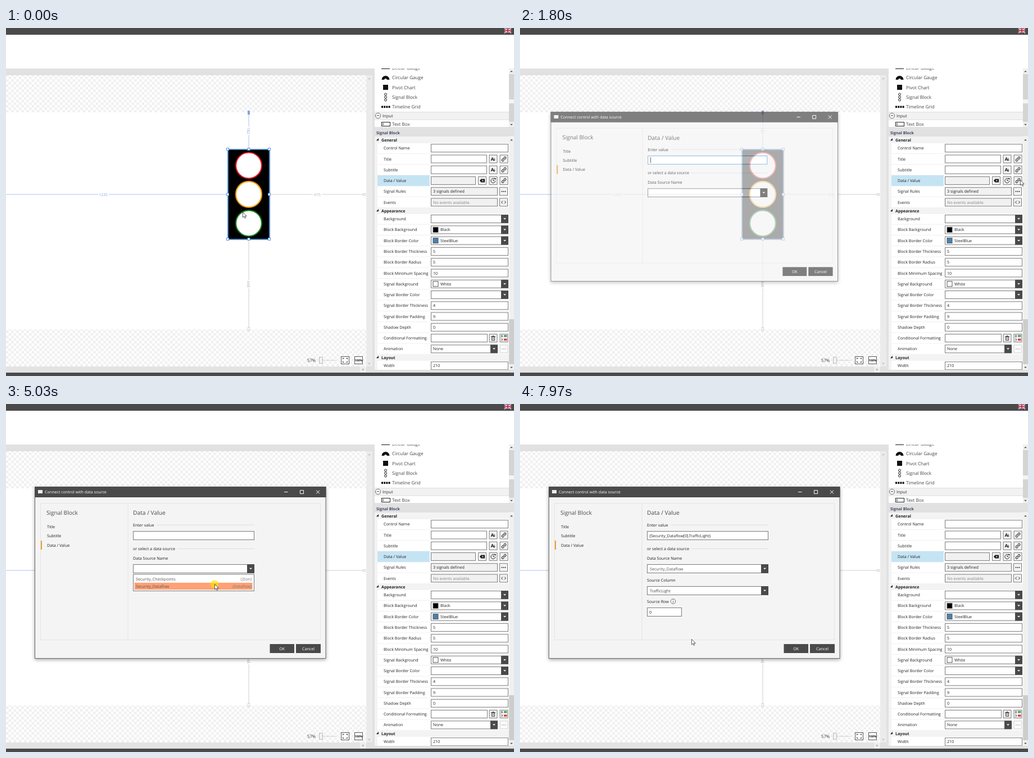
Recreate the animation shown at these times as an HTML page. Size 904x619 px, loop 8 s.

```html
<!DOCTYPE html>
<html lang="en">
<head>
<meta charset="utf-8">
<title>Connect a signal block</title>
<style>
html, body { margin: 0; width: 100%; height: 100%; overflow: hidden; background: #fff; }
svg { display: block; }
text { font-family: "Open Sans", "Noto Sans", sans-serif; text-rendering: geometricPrecision; }
</style>
</head>
<body>
<svg id="stage" width="904" height="619" viewBox="0 0 904 619"></svg>
<script>
const DARK = '#4a4a4a', BORDER = '#7a7a7a', BLUE = '#a9c2ef', GREY = '#cfcfcf';

const rect = (x, y, w, h, fill, extra = '') =>
  `<rect x="${x}" y="${y}" width="${w}" height="${h}" fill="${fill}" ${extra}/>`;
const box = (x, y, w, h, fill = '#fff', line = BORDER) =>
  rect(x + .5, y + .5, w - 1, h - 1, fill, `stroke="${line}"`);
const path = (d, stroke = '#222', width = 1, fill = 'none') =>
  `<path d="${d}" fill="${fill}" stroke="${stroke}" stroke-width="${width}"/>`;
const circle = (x, y, r, fill, stroke = 'none', width = 1) =>
  `<circle cx="${x}" cy="${y}" r="${r}" fill="${fill}" stroke="${stroke}" stroke-width="${width}"/>`;
// y is the vertical middle of the capitals
const text = (x, y, str, fill = '#222', size = 7.15, extra = '') =>
  `<text x="${x}" y="${y + size * .36}" font-size="${size}" fill="${fill}" ${extra}>${str}</text>`;
const arrow = (x, y, dir, fill = '#555', s = 2.5) =>
  path(`M${x - s} ${y - dir * s / 2}h${2 * s}l${-s} ${dir * s}z`, 'none', 0, fill);
const combo = (x, y, w, h = 16) =>
  box(x, y, w, h) + rect(x + w - 13, y, 13, h, DARK) + arrow(x + w - 6.5, y + h / 2, 1, '#fff');
const BOLD = 'font-weight="700"', MID = 'text-anchor="middle"', END = 'text-anchor="end"';

function frameAndCanvas() {
  let s = `<defs><pattern id="check" width="9.12" height="9.12" patternUnits="userSpaceOnUse">
    <path d="M0 0h4.56v9.12h4.56v-4.56h-9.12z" fill="#f0f0f0"/></pattern>
    <clipPath id="tools"><rect x="656" y="72" width="239" height="104"/></clipPath>
    <filter id="shadow" x="-5%" y="-5%" width="110%" height="112%">
    <feDropShadow dx="0" dy="2" stdDeviation="3" flood-opacity=".35"/></filter></defs>`;
  s += rect(0, 0, 904, 619, '#fff') + rect(0, 0, 904, 12, DARK) + rect(0, 72, 656, 541, '#e1e1e1');
  s += rect(887, 0, 12, 9, '#26356f') + path('M887 0l12 9M899 0l-12 9', '#fff', 1.8)
    + path('M887 0l12 9M899 0l-12 9', '#c8233a', .6)
    + path('M893 0v9M887 4.5h12', '#fff', 3.4) + path('M893 0v9M887 4.5h12', '#c8233a', 1.9);
  s += rect(0, 84, 641, 518, '#fff') + rect(0, 84, 641, 518, 'url(#check)') + rect(0, 150, 641, 386, '#fff');
  s += rect(641, 84, 11, 518, '#ebebeb') + arrow(646.5, 90, -1, '#aaa', 2) + arrow(646.5, 597, 1, '#aaa', 2);
  s += rect(0, 602, 641, 11, '#e3e3e3') + rect(630, 602, 11, 11, '#eee') + path('M634.5 605.5l2.5 2-2.5 2z', 'none', 0, '#999');

  s += path('M0 296h164M183 296h212M432 150v25M432 190v26', BLUE) + rect(430, 147, 4, 7, '#7fa3e0');
  s += path('M469 296h77M563 296h74M432 376v72M432 463v73', GREY)
    + box(635, 294, 5, 4, '#fff', GREY) + box(430, 532, 4, 7, '#fff', GREY);
  s += text(173, 296, '1235', '#8eabdf', 7, MID) + text(554, 296, '475', '#b5b5b5', 7, MID);
  s += `<g transform="translate(432 182.5) rotate(90)">${text(0, 0, '182', '#8eabdf', 7, MID)}</g>`
    + `<g transform="translate(432 455.5) rotate(90)">${text(0, 0, '448', '#b5b5b5', 7, MID)}</g>`;

  s += rect(395, 216, 74, 160, '#000', 'stroke="#4682b4" stroke-width="2" rx="2"');
  ['#dd1620', '#f79a0c', '#157a1d'].forEach((c, i) => s += circle(432, 244.5 + i * 51.4, 23, '#fff', c, 2.2));
  s += path('M394.5 215.5h74v160h-74z', '#5b92de', 1);
  for (const x of [394.5, 432, 468.5]) for (const y of [215.5, 296, 375.5])
    if (x != 432 || y != 296) s += box(x - 2.5, y - 2.5, 5, 5, '#fff', '#5b92de');

  s += text(536, 591, '57%', '#333', 7.7) + path('M563 591h25', '#ccc') + box(557, 585, 7, 12, '#f2f2f2', '#bbb');
  s += box(596, 584, 15, 14, '#fff', '#555') + path('M599.5 589v-1.5h2M605.5 587.5h2v1.5M607.5 593v1.5h-2M601.5 594.5h-2v-1.5', '#222')
    + box(620, 584, 15, 14, '#fff', '#555') + text(627.5, 591, '100%', '#111', 5.2, `${BOLD} ${MID}`);
  return s;
}

function toolbox() {
  let s = rect(656, 72, 248, 541, '#fff') + '<g clip-path="url(#tools)">';
  ['Linear Gauge', 'Circular Gauge', 'Pivot Chart', 'Signal Block', 'Timeline Grid']
    .forEach((name, i) => s += text(687, 71 + i * 17.35, name, '#444', 8.15));
  s += rect(668, 70, 15, 3, '#111');
  s += path('M668.5 92a7 7 0 0 1 14 0h-4.5a2.6 2.6 0 0 0-5 0z', 'none', 0, '#111') + rect(671, 101, 9, 9, '#111');
  for (const y of [118, 123, 128]) s += circle(675.5, y, 2, '#fff', '#222', 1);
  for (let i = 0; i < 4; i++) s += rect(668 + i * 4.2, 138.5, 3, 3.6, '#111');
  s += rect(656, 149, 239, 14, '#f2f2f2') + path('M656 149.5h239M656 163h239', '#ddd')
    + circle(662, 156, 4.7, '#fff', '#555', .9) + path('M659.8 157l2.2-2.2 2.2 2.2', '#333') + text(670, 156, 'Input', '#333', 7.5);
  s += box(668, 167, 16, 8, '#fff', '#222') + path('M671 169v4', '#222') + text(687, 171, 'Text Box', '#444', 8.15) + '</g>';
  s += rect(895, 72, 9, 104, '#f0f0f0') + rect(895, 82, 9, 85, '#d4d4d4') + rect(895, 127, 9, 7, '#f4f4f4')
    + arrow(899.5, 77, -1) + arrow(899.5, 172, 1);
  return s;
}

// Button glyphs, drawn around the centre of a 15px button
const GLYPH = {
  font: text(-1.5, 0, 'A', '#111', 8, `${BOLD} ${MID}`) + path('M2 -1.5v4M.8 1.5l1.2 1.5 1.2-1.5', '#111', .9),
  link: '<g transform="rotate(-45)">' + path('M-.3 -1.7h-2.7a1.7 1.7 0 0 0 0 3.4h2M.3 1.7h2.7a1.7 1.7 0 0 0 0-3.4h-2M-1.8 0h3.6', '#222') + '</g>',
  clear: path('M-4.5 0l2.5-3h6.5v6h-6.5z', 'none', 0, '#111') + path('M-.8 -1.5l3 3m0-3l-3 3', '#fff', .9),
  clock: path('M2.8 -2.6a4 4 0 1 0 1.1 2.8M0 -2.2v2.4h2', '#222') + path('M1.5 -4.5h3v3z', 'none', 0, '#222'),
  dots: [-3, 0, 3].map(x => circle(x, 0, .95, '#222')).join(''),
  code: path('M-1.5 -2.5l-2.5 2.5 2.5 2.5M1.5 -2.5l2.5 2.5-2.5 2.5', '#222'),
  bin: path('M-2.5 -2h5v6h-5zM-4 -2.8h8M-1 -4h2M0 -.5v3', '#222', .9),
  rules: rect(-5, -5, 3, 1, '#333') + rect(-5, -3, 3, 1, '#333') + rect(0, -5.5, 5.5, 3.5, '#54a15c')
    + path('M-4.5 1l2.5 1.8-2.5 1.8', '#333') + rect(0, 1, 5.5, 3.5, '#d8434a')
};
const button = (x, y, glyph, faded) => `<g opacity="${faded ? .35 : 1}">` + box(x - 7.5, y - 7.5, 15, 15, '#f3f3f3')
  + `<g transform="translate(${x} ${y})">${GLYPH[glyph]}</g></g>`;

function properties() {
  let s = rect(656, 176, 248, 17, '#e1e1e1') + text(659, 186.5, 'Signal Block', '#424860', 7, BOLD);
  s += rect(656, 193, 5, 415, '#f3f3f3');
  const group = (y, name) => s += rect(656, y - 6, 239, 12, '#f3f3f3') + path(`M663 ${y - 3}v4.2h-4.2z`, 'none', 0, '#222')
    + text(668, y, name, '#222', 7.15, BOLD);
  const row = (y, name, value) => {
    s += path(`M661 ${y + 9.6}h234`, '#ececec', .8);
    if (name == 'Data / Value') s += rect(661, y - 9.5, 93, 19, '#c5e4f3');
    s += text(672, y, name) + value(y);
  };
  const field = (str = '', w = 138, fill = '#fff', color = '#222') => y =>
    box(756, y - 7.5, w, 15, fill) + text(760, y, str, color);
  const pick = (str = '', color) => y => combo(756, y - 7.5, 138, 15)
    + (color ? box(759.5, y - 5, 10, 10, color, '#555') + text(773, y, str) : '');
  const plus = (base, ...buttons) => y => base(y) + buttons.map(([x, g, f]) => button(x, y, g, f)).join('');
  const styled = plus(field('', 100), [867, 'font'], [886, 'link']);

  group(199, 'General');
  [['Control Name', field()], ['Title', styled], ['Subtitle', styled],
    ['Data / Value', plus(field('', 80, '#f1f1f1'), [847.5, 'clear'], [867, 'clock'], [886, 'link'])],
    ['Signal Rules', plus(field('3 signals defined', 119, '#f1f1f1'), [885.5, 'dots'])],
    ['Events', plus(field('No events available.', 119, '#f1f1f1', '#888'), [885.5, 'code'])]
  ].forEach(([name, value], i) => row(213.7 + i * 19.25, name, value));

  group(325, 'Appearance');
  const animation = y => combo(756, y - 7.5, 119, 15) + text(760, y, 'None') + button(886, y, 'dots', true);
  [['Background', pick()], ['Block Background', pick('Black', '#000')], ['Block Border Color', pick('SteelBlue', '#4682b4')],
    ['Block Border Thickness', field('5')], ['Block Border Radius', field('5')], ['Block Minimum Spacing', field('10')],
    ['Signal Background', pick('White', '#fff')], ['Signal Border Color', pick()], ['Signal Border Thickness', field('4')],
    ['Signal Border Padding', field('9')], ['Shadow Depth', field('0')],
    ['Conditional Formatting', plus(field('', 101), [867, 'bin'], [886, 'rules'])], ['Animation', animation]
  ].forEach(([name, value], i) => row(339.6 + i * 19.27, name, value));

  group(586, 'Layout');
  row(600.8, 'Width', field('210'));
  s += rect(895, 194, 9, 414, '#f0f0f0') + rect(895, 518, 9, 80, '#cdcdcd') + arrow(899.5, 199, -1) + arrow(899.5, 604, 1);
  return s + rect(656, 608, 248, 5, '#e1e1e1') + rect(0, 613, 904, 6, DARK);
}

const ROW = 12.4;
function list(id, y, h, names, kinds) {
  const rows = names.map((name, i) => {
    const top = y + 3.4 + i * ROW;
    return `<g>${rect(228.5, top - .4, 210, ROW, 'none')}${text(231, top + 6, name, '#555')}`
      + `${text(437, top + 6, `(${kinds[i] || kinds[0]})`, '#777', 7.15, END)}</g>`;
  }).join('');
  return `<g id="${id}">${box(226, y, 216, h)}<g>${rows}</g></g>`;
}

function dialog() {
  const action = (x, w, label) => rect(x, 427, w, 16, DARK) + text(x + w / 2, 435, label, '#fff', 7.15, MID);
  let s = `<g id="dialog"><g filter="url(#shadow)">${box(51, 147, 518.5, 306, '#f4f4f4', '#666')}</g>`;
  s += rect(51, 147, 518.5, 19, DARK) + rect(57, 153, 8, 6, '#eee') + text(69, 156.7, 'Connect control with data source', '#fff');
  s += path('M495 156.5h6.5M523.5 153.5h6v6h-6zM552 153.5l6 6m0-6l-6 6', '#fff');
  s += path('M61.5 176.5h498v243h-498zM217 176.5v243', '#e4e4e4') + rect(62, 243, 2, 16, '#eb9b2f');
  s += text(72, 193, 'Signal Block', '#484848', 10.1) + text(226, 193.5, 'Data / Value', '#484848', 10.25);
  ['Title', 'Subtitle', 'Data / Value'].forEach((name, i) => s += text(73, 218.7 + i * 16.2, name));
  s += text(226, 215, 'Enter value') + text(226, 257.3, 'or select a data source') + text(226, 274, 'Data Source Name');
  s += path('M268 215h174M304 257.5h138', '#dedede');
  s += `<g id="entry">${box(226, 226, 216, 16)}</g>` + rect(231, 229, 1, 10, '#222', 'id="caret"') + text(230, 234, '', '#222', 7, 'id="value"');
  s += combo(226, 285, 216) + text(231, 293.3, '', '#555', 7.15, 'id="source"');
  s += '<g id="details">' + text(226, 313, 'Source Column') + combo(226, 324, 216) + text(231, 332, '', '#444', 7.15, 'id="column"')
    + text(226, 351.5, 'Source Row') + circle(272.5, 351, 4.2, '#fff', '#444', .8) + path('M272.5 350.3v3.2M272.5 348.3v1', '#444', .9)
    + box(226, 362, 62, 16) + text(230, 370, '0') + '</g>';
  s += action(469.5, 43.5, 'OK') + action(516, 44, 'Cancel');
  s += list('sources', 302.5, 30.5, ['Security_Checkpoints', 'Security_Dataflow'], ['JSon', 'Dataflow']);
  s += list('columns', 340.5, 93, ['Terminal', 'WaitTime', 'Status', 'Alert', 'Indicator', 'Testbed', 'TrafficLight'], ['String']);
  return s + '</g>';
}

const $ = id => document.getElementById(id);
$('stage').innerHTML = frameAndCanvas() + toolbox() + properties() + dialog()
  + '<g id="pointer">' + '<circle id="halo" cy=".5" r="7.3" fill="#ffe400" opacity=".65"/>'
  + '<path id="arrow" d="M.4 .4V10l2.2-2 1.6 3.4 1.5-.7-1.5-3.2h3z" fill="#fff" stroke="#333" stroke-width=".8"/>'
  + '<path id="hand" d="M-1.3 1a1.1 1.1 0 0 1 2.3 0v4l4 .8q1.4.5 1.2 2l-.9 4.7h-5.9l-3-4.2q-.5-1.5.8-1.2l1.5 1z" fill="#fff" stroke="#222" stroke-width=".9"/></g>';

const show = (id, on) => $(id).style.display = on ? '' : 'none';
const within = (t, a, b) => t >= a && t < b;

// Pointer stops: time, x, y
const STOPS = [[0, 421, 327], [600, 872, 263], [830, 896, 268], [1090, 896, 268], [1160, 880, 264], [1300, 890, 270],
  [2190, 890, 270], [3010, 439, 294], [3290, 439, 294], [3540, 424, 292], [3960, 424, 292], [4790, 373, 319],
  [4870, 373, 319], [5020, 371, 320], [5590, 371, 320], [5800, 361, 335], [6430, 361, 335], [7030, 313.5, 425],
  [7850, 313.5, 425], [7960, 305, 418]];
const CLICKS = [[1480, 1630], [3100, 3250], [5030, 5200], [6110, 6270], [7350, 7500]];

function pointerAt(t) {
  // the screen is sampled about 13 times a second
  const q = Math.max(0, 70 + 77.45 * Math.floor((t - 60) / 77.45));
  const i = STOPS.findIndex(s => s[0] > q);
  if (i < 0) return STOPS[STOPS.length - 1].slice(1);
  const [t0, x0, y0] = STOPS[i - 1], [t1, x1, y1] = STOPS[i];
  const u = (q - t0) / (t1 - t0), e = u * u * (3 - 2 * u);
  return [x0 + (x1 - x0) * e, y0 + (y1 - y0) * e];
}

function paintRows(id, top, y, selected) {
  [...$(id).lastElementChild.children].forEach((g, i) => {
    const [bar, name, kind] = g.children, hover = i == Math.floor((y - top) / ROW);
    bar.setAttribute('fill', i == selected ? '#444' : hover ? '#ffa075' : 'none');
    name.setAttribute('fill', i == selected ? '#fff' : '#555');
    kind.setAttribute('fill', i == selected ? '#666' : '#777');
  });
}

function draw(t) {
  const [x, y] = pointerAt(t), chosen = t >= 5200;
  const step = Math.floor((t - 1630) / 80 + .05);
  const alpha = Math.min(1, .13 + .285 * step), size = 1 - .045 * (1 - alpha);
  show('dialog', t >= 1630);
  $('dialog').setAttribute('opacity', Math.max(0, alpha));
  $('dialog').setAttribute('transform', `translate(310 300) scale(${size}) translate(-310 -300)`);

  const focus = t < 3180;
  $('entry').firstChild.setAttribute('stroke', focus ? '#5aa0e0' : BORDER);
  show('caret', focus && !within(t, 2330, 2870));
  const column = t < 7500 ? 'Terminal' : 'TrafficLight';
  $('value').textContent = chosen ? `{Security_Dataflow[0].${column}}` : '';
  $('source').textContent = chosen ? 'Security_Dataflow' : '';
  $('column').textContent = column;
  show('details', chosen);
  show('sources', within(t, 3180, 5200));
  show('columns', within(t, 6190, 7500));
  paintRows('sources', 305.7, y, -1);
  paintRows('columns', 343.5, y, 0);

  const hand = t > 1950 && x < 442 && (within(y, 285, 302) || chosen && within(y, 324, 341));
  show('hand', hand);
  show('arrow', !hand);
  show('halo', CLICKS.some(([a, b]) => within(t, a, b)));
  $('pointer').setAttribute('transform', `translate(${x} ${y})`);
}

const start = performance.now();
function tick() {
  draw((performance.now() - start) % 8000);
  requestAnimationFrame(tick);
}
tick();
</script>
</body>
</html>
```
